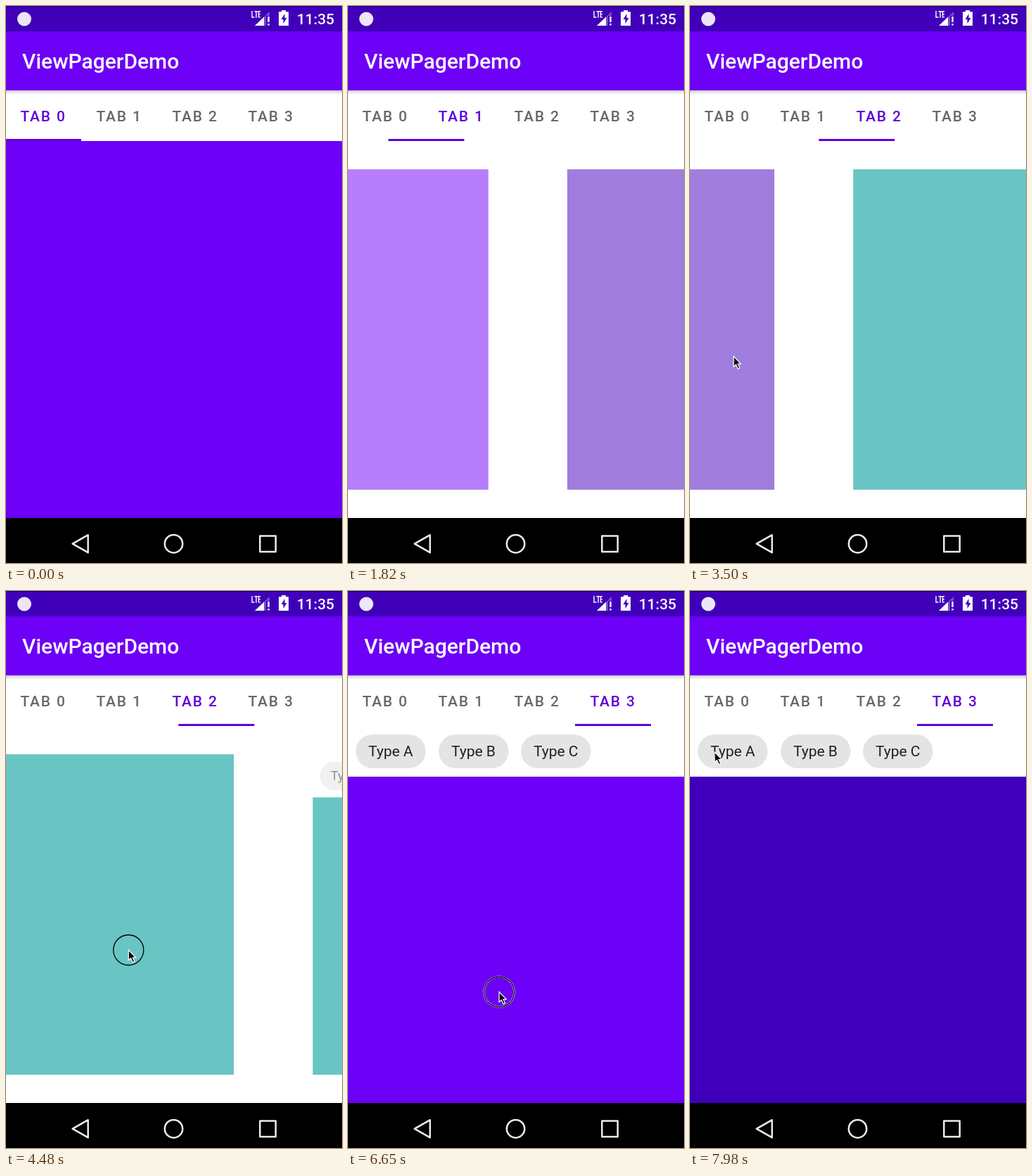
An HTML page for the animation above (8000 ms loop, 478 by 792 pixels).

```html
<!DOCTYPE html>
<html lang="en">
<head>
<meta charset="utf-8">
<title>ViewPagerDemo</title>
<style>
  html, body { margin: 0; width: 100%; height: 100%; overflow: hidden; background: #fff; }
  svg { display: block; width: 478px; height: 792px; }
  text { font-family: Roboto, "Noto Sans", sans-serif; font-size: 21px; }
  .title, .clock, .tab { font-weight: 500; }
  .title { font-size: 30px; fill: #fff; }
  .clock { fill: #fff; }
  .tab { letter-spacing: .0893em; fill: #686868; }
  .tab.on, #bar { fill: #6000dc; }
  .chip rect { fill: #e4e4e4; }
  .chip text { fill: #202020; }
  .nav { fill: none; stroke: #ececec; stroke-width: 2.5; stroke-linejoin: round; }
</style>
</head>
<body>
<svg viewBox="0 0 478 792">
  <defs>
    <linearGradient id="shade" x2="0" y2="1">
      <stop stop-color="#000" stop-opacity=".19"/>
      <stop offset="1" stop-color="#000" stop-opacity="0"/>
    </linearGradient>
  </defs>
  <rect width="478" height="792" fill="#fff"/>

  <!-- The 480px wide screen is cropped by one pixel on each side. -->
  <g transform="translate(-1 192)">
    <g class="page"><rect width="480" height="536"/></g>
    <g class="page"><rect width="480" height="536"/></g>
    <g class="page"><rect width="480" height="536"/></g>
    <g class="page">
      <g id="chips"></g>
      <g transform="translate(0 72)">
        <g class="sub"><rect width="480" height="464"/></g>
        <g class="sub"><rect width="480" height="464"/></g>
        <g class="sub"><rect width="480" height="464"/></g>
      </g>
    </g>
  </g>

  <g id="tabs"></g>
  <rect id="bar" y="189" width="108" height="3"/>

  <rect y="120" width="478" height="6" fill="url(#shade)"/>
  <rect y="36" width="478" height="84" fill="#6d00f6"/>
  <text class="title" x="23" y="89">ViewPagerDemo</text>

  <rect width="478" height="36" fill="#4000b9"/>
  <rect width="478" height="1" fill="#1d0060"/>
  <circle cx="26" cy="18.5" r="10" fill="#ece6f6"/>
  <path d="M350 7v9h3.5M353.5 7.7h5M356 7.7v9M362 7.7h-2.6v8.2h2.6M359.4 11.8h2.4" fill="none" stroke="#fff" stroke-width="1.4"/>
  <path d="M354 28L375 8V14H370V28Z" fill="#fff" opacity=".3"/>
  <path d="M354 28L367 15.5V28ZM372.3 15h2.4v8h-2.4zM372.3 25h2.4v2.6h-2.4z" fill="#fff"/>
  <path d="M392 6h6v2.3h4V28h-14V8.3h4z" fill="#fff"/>
  <path d="M396.5 11l-5 8h3v6l5-8h-3z" fill="#4000b9"/>
  <text class="clock" x="413.7" y="26">11:35</text>

  <rect y="728" width="478" height="64"/>
  <g class="nav">
    <path d="M94.7 764.7L116.7 752.2V777.2Z"/>
    <circle cx="238.5" cy="764.7" r="12.7"/>
    <rect x="361.3" y="753.5" width="22.4" height="22.4"/>
  </g>

  <g id="cursor">
    <g id="ring" fill="none">
      <circle id="halo" r="21.5" stroke="#fff" stroke-width="2.6" opacity=".75"/>
      <circle r="21.5" stroke="#000" stroke-width="1.3"/>
    </g>
    <path d="M0 0V14.5L3.3 11.5L6 17.5L8.6 16.4L6 10.6H10.3Z" stroke="#fff" stroke-width="1.2"/>
  </g>
</svg>

<script>
const $ = id => document.getElementById(id);
const all = sel => [...document.querySelectorAll(sel)];
const LOOP = 8000, STEP = 70, W = 480, MIN_SCALE = .85, SETTLE = 300;

// Channels may go below 0: they are clamped only after fading to white.
const PURPLE = [109, -4, 247], DARK = [64, -5, 187], TEAL = [-46, 139, 134];

$('tabs').innerHTML = [0, 1, 2, 3].map(i =>
  `<text class="tab" x="${20.5 + i * 108}" y="164.3">TAB ${i}</text>`).join('');
$('chips').innerHTML = ['A', 'B', 'C'].map((c, i) => {
  const x = Math.round(12 + i * 117.6);
  return `<g class="chip"><rect x="${x}" y="12" width="99.5" height="48" rx="24"/>` +
    `<text x="${x + 18}" y="43.4">Type ${c}</text></g>`;
}).join('');

const pages = all('.page'), subs = all('.sub'), tabs = all('.tab');

// A swipe grabs at (x, y), drags left by a share of the width, then settles.
const swipe = (start, drag, share, x, y) => ({ start, drag, share, x, y, end: start + drag });
const first = swipe(1400, 420, .54);
const outer = [first, swipe(3010, 420, .5, 295, 498), swipe(4200, 420, .421, 309, 510.5)];
const inner = [swipe(5460, 420, .366, 260, 558), swipe(6650, 350, .4, 215, 570)];

// The cursor visits each grab point, from its entry to its rest.
const enter = swipe(2520, 0, 0, 470, 560), rest = swipe(7770, 0, 0, 35, 229);
const stops = [enter, ...outer.slice(1), ...inner, rest];

const clamp = u => Math.min(1, Math.max(0, u));
const mix = (a, b, u) => a + (b - a) * u;

const dragged = (s, t) => s.share * clamp((t - s.start) / s.drag);

function progress(s, t) {
  const u = clamp((t - s.end) / SETTLE);
  return mix(dragged(s, t), 1, 1 - (1 - u) ** 2);
}
const position = (swipes, t) => swipes.reduce((sum, s) => sum + progress(s, t), 0);

function cursorAt(t) {
  const i = stops.findIndex(s => t < s.end);
  if (i < 0) return rest;
  const to = stops[i];
  if (i === 0) return to;
  if (t >= to.start) return { x: to.x - W * dragged(to, t), y: to.y };
  const from = stops[i - 1];
  const u = clamp((t - from.end) / (to.start - STEP - from.end));
  const e = u * u * (3 - 2 * u);
  return { x: mix(from.x - W * from.share, to.x, e), y: mix(from.y, to.y, e) };
}

// Zoom-out page transition; returns the page's alpha.
function place(el, pos, h) {
  const shown = Math.abs(pos) < 1;
  el.style.display = shown ? '' : 'none';
  if (!shown) return 0;
  const s = Math.max(MIN_SCALE, 1 - Math.abs(pos));
  const mx = W * (1 - s) / 2, my = h * (1 - s) / 2;
  const x = pos * W + 2 * mx + Math.sign(pos) * my / 2;
  el.setAttribute('transform', `translate(${x} ${my}) scale(${s})`);
  return .5 + (s - MIN_SCALE) / (1 - MIN_SCALE) * .5;
}

function paint(el, rgb, alpha) {
  const c = rgb.map(v => Math.max(0, Math.round(mix(255, v, alpha))));
  el.querySelector('rect').style.fill = `rgb(${c})`;
}

function draw(t) {
  const p = position(outer, t), q = position(inner, t);
  const alphas = pages.map((el, i) => place(el, i - p, 536));
  [PURPLE, DARK, TEAL].forEach((c, i) => paint(pages[i], c, alphas[i]));
  $('chips').style.opacity = alphas[3];
  [TEAL, PURPLE, DARK].forEach((c, i) =>
    paint(subs[i], c, place(subs[i], i - q, 464) * alphas[3]));

  $('bar').setAttribute('x', p * 108 - 1);
  tabs.forEach((el, i) => el.classList.toggle('on', i === Math.round(p)));

  const { x, y } = cursorAt(t);
  const pressed = stops.some(s => s.drag && t >= s.start - STEP && t <= s.end);
  const still = p % 1 === 0 && q % 1 === 0;
  $('cursor').style.display = t < enter.start ? 'none' : '';
  $('cursor').setAttribute('transform', `translate(${x} ${y})`);
  $('ring').style.display = pressed ? '' : 'none';
  $('halo').style.display = still ? '' : 'none';
}

const begin = performance.now();
function tick() {
  const t = (performance.now() - begin) % LOOP;
  draw(Math.floor(t / STEP) * STEP);
  requestAnimationFrame(tick);
}
tick();
</script>
</body>
</html>
```
